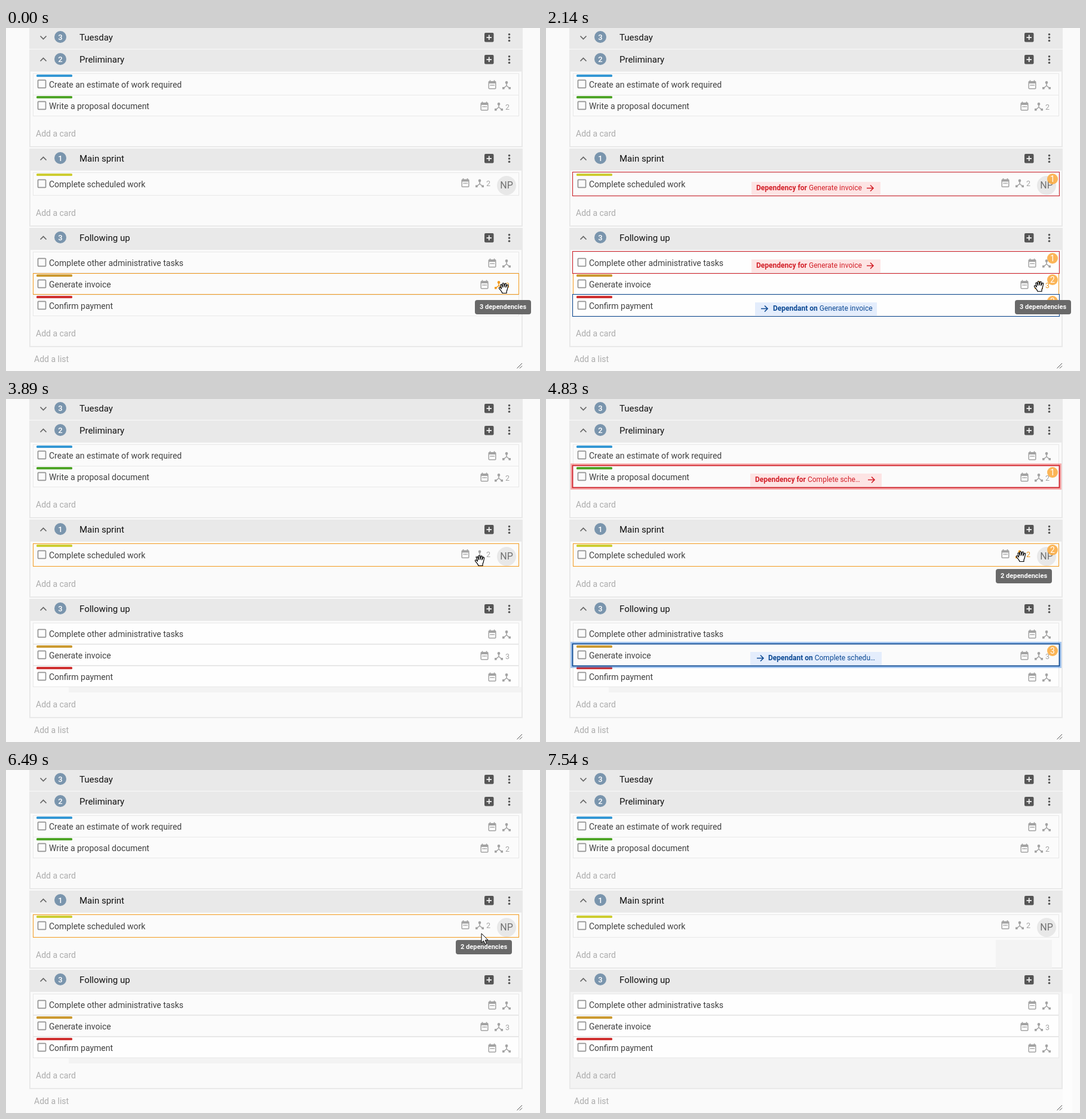
An HTML page that plays this animation: 894 px wide and 575 px high, repeating every 7880 ms.

```html
<!DOCTYPE html>
<html lang="en">
<head>
<meta charset="utf-8">
<title>Card dependencies</title>
<style>
html, body { margin: 0; width: 100%; height: 100%; overflow: hidden; background: #fafafa; }
svg { display: block; font-family: Roboto, Arial, sans-serif; }
.title { font-size: 15px; fill: #111; }
.card { font-size: 14px; fill: #424242; }
.add { font-size: 14px; fill: #acacac; }
.tip { font-size: 11px; font-weight: 700; fill: #fff; }
.label { font-size: 12px; }
.label tspan { font-weight: 700; }
.count { font-size: 12.5px; }
</style>
</head>
<body>
<svg id="stage" width="894" height="575" viewBox="0 0 894 575"></svg>
<script>
const LOOP = 7880;
const GREY = '#a3a3a3', ORANGE = '#f39a1e', RED = '#d32029', BLUE = '#0d4a94';
const stage = document.getElementById('stage');

function el(tag, attrs, parent = stage, text) {
  const node = document.createElementNS('http://www.w3.org/2000/svg', tag);
  for (const key in attrs) node.setAttribute(key, attrs[key]);
  if (text !== undefined) node.textContent = text;
  parent.appendChild(node);
  return node;
}
const rect = (x, y, width, height, fill, more, parent) =>
  el('rect', { x, y, width, height, fill, ...more }, parent);
const frame = (x, y, width, height, stroke, parent) =>
  rect(x + .5, y + .5, width - 1, height - 1, 'none', { stroke }, parent);
const text = (x, y, cls, str, more, parent) =>
  el('text', { x, y, class: cls, ...more }, parent, str);
const line = (d, stroke, width, parent, more) =>
  el('path', { d, fill: 'none', stroke, 'stroke-width': width, ...more }, parent);
const group = (parent, more) => el('g', more || {}, parent);
const show = (node, alpha) => node.setAttribute('opacity', alpha);

function header(y, title, count, open) {
  const c = y + 17;
  rect(39, y, 826, 36, '#e9e9e9');
  line(open ? `M57.5 ${c + 2.5}l5-5 5 5` : `M57.5 ${c - 2.5}l5 5 5-5`, '#666', 1.7);
  el('circle', { cx: 91, cy: c - 1, r: 10, fill: '#7a95ad' });
  text(91, c + 3.5, '', count, { fill: '#fff', 'font-size': 13, 'font-weight': 500, 'text-anchor': 'middle' });
  text(123, c + 5, 'title', title);
  rect(801, c - 8, 15.5, 15.5, '#555', { rx: 2 });
  line(`M804.5 ${c - .2}h8.5m-4.25-4.25v8.5`, '#f4f4f4', 1.8);
  for (const d of [-5.3, 0, 5.3]) el('circle', { cx: 842.5, cy: c + d, r: 1.8, fill: '#555' });
}

function list(y, bottom, title, count) {
  const body = rect(40, y + 36, 824, bottom - y - 37, '#fafafa', { stroke: '#e9e9e9', 'stroke-width': 2 });
  header(y, title, count, true);
  text(50, bottom - 18, 'add', 'Add a card');
  return body;
}

function calendar(x, y) {
  rect(x - 5.8, y - 5.3, 11.6, 12, 'none', { rx: 1, stroke: GREY, 'stroke-width': 1.5 });
  rect(x - 6, y - 5.5, 12, 3.5, GREY);
  line(`M${x - 3.5} ${y - 7.5}v3m7-3v3`, GREY, 1.7);
  line(`M${x - 3.5} ${y + .8}h2m.6 0h2m.6 0h2`, GREY, 1.7);
}

function hub(x, y, count) {
  const g = group(stage, { color: GREY });
  el('circle', { cx: x, cy: y - 4.3, r: 2.3, fill: 'currentColor' }, g);
  line(`M${x} ${y - 3}v4l-5 4.2m5-4.2l5 4.2`, 'currentColor', 1.5, g);
  rect(x - 7, y + 3.3, 3.6, 3.6, 'currentColor', {}, g);
  rect(x + 3.4, y + 3.3, 3.6, 3.6, 'currentColor', {}, g);
  if (count) text(x + 11, y + 5, 'count', count, { fill: 'currentColor' }, g);
  return g;
}

function card(y, height, title, bar, count, avatar) {
  const c = y + Math.floor(height / 2), right = avatar ? 793 : count ? 825 : 838;
  const box = rect(45.5, y + .5, 813, height - 1, '#fbfbfb', { stroke: '#e8e8e8' });
  if (bar) rect(51, y + 2, 60, 4, bar, { rx: 1.5 });
  rect(53.5, c - 6.7, 13, 13, 'none', { rx: 1, stroke: '#949494', 'stroke-width': 1.7 });
  text(72, c + 6, 'card', title);
  const iconY = avatar ? c - 1.5 : c + 1;
  calendar(right - 24, iconY);
  const icon = hub(right, iconY + .7, count);
  if (avatar) {
    el('circle', { cx: 838, cy: 264, r: 16, fill: '#e8e8e8' });
    text(838, 269, '', avatar, { fill: '#707070', 'font-size': 16, 'text-anchor': 'middle' });
  }
  return { y, height, box, icon };
}

// Board
header(-1, 'Tuesday', 3, false);
list(36, 200, 'Preliminary', 2);
list(202, 333, 'Main sprint', 1);
const lastBody = list(335, 535, 'Following up', 3);
text(47, 560, 'add', 'Add a list');
const strip = rect(105, 483, 758, 9, '#f3f3f3');
const estimate = card(76, 37, 'Create an estimate of work required', '#3598d4');
const proposal = card(112, 36, 'Write a proposal document', '#4fa528', 2);
const work = card(242, 39, 'Complete scheduled work', '#cdcd32', 2, 'NP');
const admin = card(375, 36, 'Complete other administrative tasks');
const invoice = card(411, 36, 'Generate invoice', '#cb9a32', 3);
const payment = card(447, 36, 'Confirm payment', '#cf3030');
const lower = [admin, invoice, payment], cards = [estimate, proposal, work, ...lower];
line('M855.5 570.5l8.5-8.5m-4 8.5l4-4', '#555', 1);
const ghost = group();
rect(753, 285, 94, 47, '#f3f3f3', {}, ghost);
rect(865, 375, 16, 200, '#fdfdfd', {}, ghost);
const hoverBox = frame(45, 0, 814, 36, ORANGE);

// Dependency highlights
function badge(y, n, parent) {
  el('circle', { cx: 848, cy: y, r: 9, fill: '#fbad45', opacity: .9 }, parent);
  text(848, y + 5, '', n, { fill: '#fff', 'font-size': 14, 'text-anchor': 'middle' }, parent);
}

function mark({ y, height }, blue, n, label, parent, pulses) {
  const color = blue ? BLUE : RED;
  const halo = rect(42.5, y - 2.5, 819, height + 5, 'none',
    { stroke: blue ? '#2f7fe0' : '#f04040', 'stroke-width': 3 }, parent);
  const edge = frame(44, y - 1, 816, height + 2, color, parent);
  pulses.push({ halo, edge });
  const [x, w, textX, arrowX, ly, bold, rest] = label;
  rect(x, ly, w, 22, blue ? '#e4edfc' : '#fde4e4', {}, parent);
  const t = text(textX, ly + 14, 'label', undefined, { fill: color }, parent);
  el('tspan', {}, t, bold);
  t.append(' ' + rest);
  line(`M${arrowX - 6} ${ly + 10.5}h11m-5-5l5 5-5 5`, color, 1.6, parent);
  badge(y + 11, n, parent);
}

function scene(source, n, start, end, marks) {
  const g = group(), pulses = [];
  for (const [target, blue, order, label] of marks) mark(target, blue, order, label, g, pulses);
  badge(source.y + 11, n, g);
  return { g, pulses, source, start, end };
}

const FOR = 'Dependency for', ON = 'Dependant on';
const scenes = [
  scene(invoice, 2, 60, 2260, [
    [work, false, 1, [344, 216, 352, 543, 258, FOR, 'Generate invoice']],
    [admin, false, 1, [344, 216, 352, 543, 388, FOR, 'Generate invoice']],
    [payment, true, 3, [350, 204, 380, 366, 460, ON, 'Generate invoice']]
  ]),
  scene(work, 2, 4200, 6320, [
    [proposal, false, 1, [342, 220, 350, 545, 125, FOR, 'Complete sche…']],
    [invoice, true, 3, [342, 220, 372, 359, 424, ON, 'Complete schedu…']]
  ])
];

function tooltip(x, y, w, h, lines, start, end) {
  const g = group();
  rect(x, y, w, h, '#696969', { rx: 4 }, g);
  lines.forEach((s, i) => text(x + 8, y + 15 + i * 16, 'tip', s, {}, g));
  return { g, start, end };
}
const tips = [
  tooltip(785, 456, 94, 24, ['3 dependencies'], -200, 2350),
  tooltip(749, 453, 104, 39, ['Start: 25/03/2022', 'End: 28/03/2022'], 2540, 2840),
  tooltip(753, 285, 94, 24, ['2 dependencies'], 4200, 6650)
];

// Pointer
const cursor = group();
const hand = group(cursor);
const ink = { fill: '#fff', 'stroke-linejoin': 'round' };
line('M-3 8.5C-4 5-7 3-8.5.5-9-1-7.5-2-6-.5L-4.5 1-6-4.5C-6.3-6.3-4.3-6.8-3.7-5L-2.6-1.5-2.8-7C-2.8-9-.6-9-.4-7L0-1.8 1-6.8C1.4-8.6 3.5-8.2 3.2-6.3L2.7-1.3 4.5-4.8C5.3-6.3 7.2-5.4 6.6-3.8 5.5 0 5.6 3 4 5.5L4 8.5Z',
  '#000', 1.2, hand, ink);
const arrow = line('M0 0V15.5L3.6 12.2 6 17.8 8.6 16.7 6.2 11.2H11Z', '#000', 1, cursor, ink);

const path = [
  [0, 834, 436], [240, 830, 436], [1500, 830, 436], [1560, 830, 437], [1730, 829, 436],
  [2020, 827, 434], [2140, 826, 433], [2450, 803, 425], [2740, 800, 425], [2900, 793, 412],
  [3330, 767, 345], [3590, 783, 308], [3890, 794, 271], [4150, 796, 264], [5570, 796, 264],
  [5940, 795, 266], [6280, 795, 266], [6490, 796, 274], [7060, 812, 425], [7540, 868, 578]
];

function pointAt(t) {
  const i = path.findIndex(p => p[0] > t);
  if (i < 0) return path[path.length - 1].slice(1);
  const [t0, x0, y0] = path[i - 1], [t1, x1, y1] = path[i], k = (t - t0) / (t1 - t0);
  return [x0 + (x1 - x0) * k, y0 + (y1 - y0) * k];
}

const clamp = v => Math.min(1, Math.max(0, v));
const fade = (t, { start, end }, inMs, outMs) =>
  Math.min(clamp((t - start) / inMs), 1 - clamp((t - end) / outMs));

function render(t) {
  const [x, y] = pointAt(t), visible = t < 7540;
  const hovered = visible && cards.find(c => y >= c.y && y < c.y + c.height);
  show(cursor, visible ? 1 : 0);
  cursor.setAttribute('transform', `translate(${Math.round(x)} ${Math.round(y)})`);
  const grab = hovered && (t < 6400 || t > 6650);
  show(hand, grab ? 1 : 0);
  show(arrow, grab ? 0 : 1);

  show(hoverBox, hovered ? 1 : 0);
  if (hovered) {
    hoverBox.setAttribute('y', hovered.y + .5);
    hoverBox.setAttribute('height', hovered.height - 1);
  }

  const ended = t >= 7540;
  const bright = (t >= 2000 && t < 4300) || ended;
  for (const c of lower)
    c.box.setAttribute('fill', bright || (c === payment && t >= 2000) ? '#fefefe' : '#fbfbfb');
  lastBody.setAttribute('fill', ended ? '#f3f3f3' : '#fafafa');
  strip.setAttribute('x', t < 3300 ? 454 : 105);
  strip.setAttribute('width', t < 3300 ? 409 : 758);
  show(strip, t >= 2600 && !ended ? 1 : 0);
  show(ghost, ended ? 1 : 0);

  for (const s of scenes) {
    show(s.g, fade(t, s, 200, 120));
    const k = Math.sin(Math.PI * clamp((t - s.start - 260) / 940));
    for (const { halo, edge } of s.pulses) {
      show(halo, .42 * k);
      edge.setAttribute('stroke-width', 1 + .8 * k);
    }
    const active = s.source === invoice ? t < s.end : t >= s.start - 40 && t < s.end;
    s.source.icon.setAttribute('color', active ? ORANGE : GREY);
  }
  for (const tip of tips) show(tip.g, fade(t, tip, 150, 100));
}

const begin = performance.now();
function tick() {
  render((performance.now() - begin) % LOOP);
  requestAnimationFrame(tick);
}
render(0);
requestAnimationFrame(tick);
</script>
</body>
</html>
```
